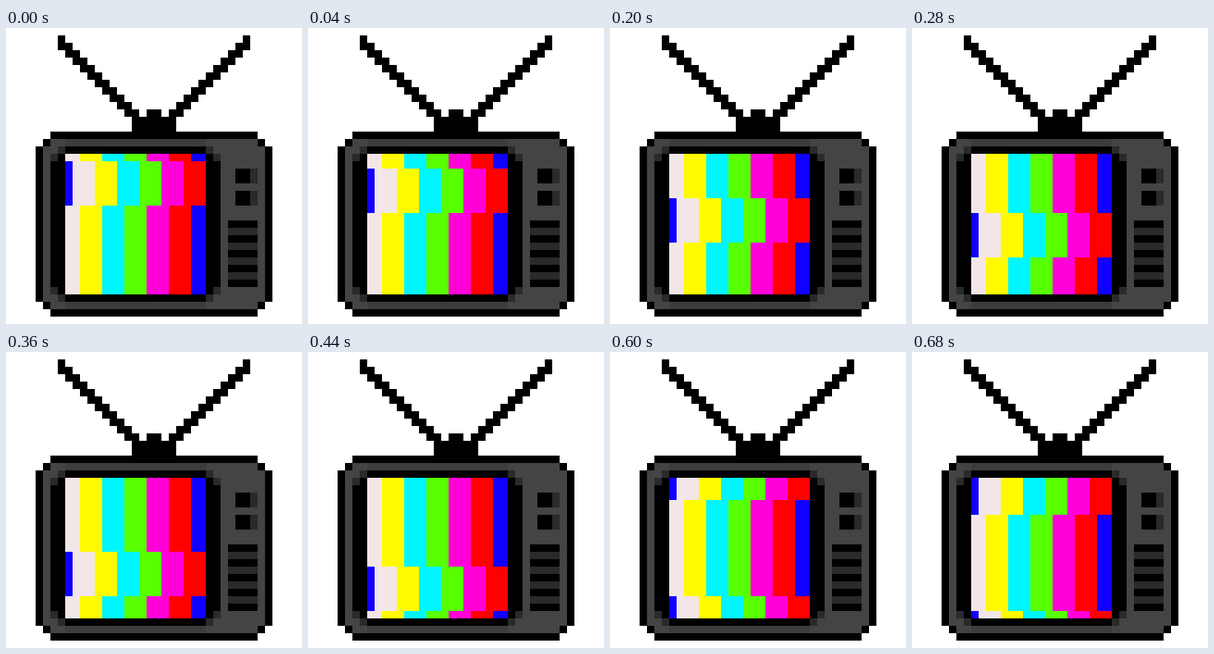
Recreate the animation shown at these times as an HTML page with a canvas. Size 400 by 400 pixels, loop 720 ms.

```html
<!DOCTYPE html>
<html lang="en">
<head>
<meta charset="utf-8">
<title>Pixel television</title>
<style>
  html, body { margin: 0; width: 100%; height: 100%; overflow: hidden; background: #fff; }
  canvas { display: block; }
</style>
</head>
<body>
<canvas id="stage" width="400" height="400"></canvas>
<script>
const ctx = document.getElementById('stage').getContext('2d');
const CELL = 10, STEP = 40, STEPS = 18;
const BLACK = '#000', BODY = '#444', BEZEL = '#3c3c3c', SHADE = '#2a2a2a';
const BARS = ['#f2e6e6', '#fffa00', '#00f6ff', '#58ff00', '#ff00d8', '#ff0000', '#1000ff'];
const SCREEN = { x: 8, y: 17, size: 19 };
const BAND = 6;

// All coordinates are in cells of the pixel grid.
function box(color, x, y, w = 1, h = 1) {
  ctx.fillStyle = color;
  ctx.fillRect(x * CELL, y * CELL, w * CELL, h * CELL);
}

function drawAntenna() {
  for (let i = 0; i < 11; i++) {
    box(BLACK, 7 + i, 1 + i, 1, 2);
    box(BLACK, 32 - i, 1 + i, 1, 2);
  }
  box(BLACK, 19, 11, 2);
  box(BLACK, 17, 12, 6, 2);
}

function drawCase() {
  box(BLACK, 6, 14, 28, 25);
  box(BLACK, 5, 15, 30, 23);
  box(BLACK, 4, 16, 32, 21);
  box(BODY, 6, 15, 28, 23);
  box(BODY, 5, 16, 30, 21);
  box(BEZEL, 8, 15, 19);
  box(BEZEL, 8, 37, 19);

  // Rounded screen frame
  box(SHADE, 7, 16, 21, 21);
  box(SHADE, 6, 17, 23, 19);
  box(BLACK, 8, 16, 19, 21);
  box(BLACK, 7, 17, 21, 19);
  box(BLACK, 6, 18, 23, 17);

  // Knobs and speaker
  for (const y of [19, 22]) {
    box(BLACK, 31, y, 2, 2);
    box(SHADE, 33, y, 1, 2);
  }
  for (let i = 0; i < 9; i++) box(i % 2 ? SHADE : BLACK, 30, 26 + i, 4);
}

function drawScreen(step) {
  const { x, y, size } = SCREEN;
  for (let row = 0; row < size; row++) {
    const inBand = (row - step - 1 + size) % size < BAND;
    const offset = inBand ? 1 : -1;
    for (let col = 0; col < size; col++) {
      const bar = Math.floor((col - offset) / 3);
      box(BARS[(bar + BARS.length) % BARS.length], x + col, y + row);
    }
  }
}

function frame() {
  const step = Math.floor(performance.now() / STEP) % STEPS;
  box('#fff', 0, 0, 40, 40);
  drawAntenna();
  drawCase();
  drawScreen(step);
  requestAnimationFrame(frame);
}
frame();
</script>
</body>
</html>
```
